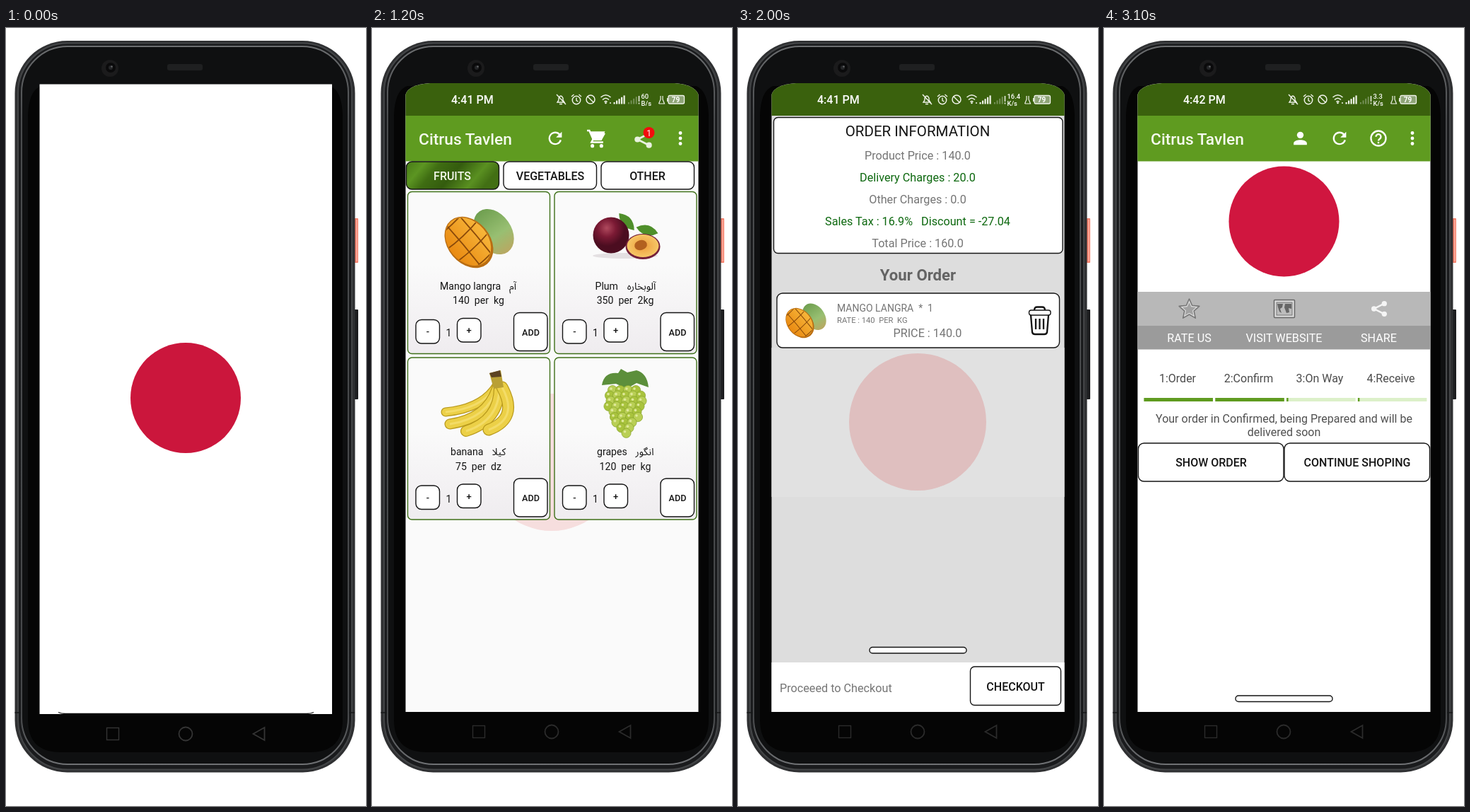
An HTML page for the animation above (3300 ms loop, 509 by 1100 pixels).

```html
<!DOCTYPE html>
<html lang="en">
<head>
<meta charset="utf-8">
<title>Grocery app walkthrough</title>
<style>
html, body { margin: 0; width: 100%; height: 100%; overflow: hidden; background: #fff; }
svg { display: block; width: 509px; height: 1100px; }
text { font-family: Roboto, "Noto Sans Arabic", "DejaVu Sans", sans-serif; white-space: pre; }
</style>
</head>
<body>
<svg id="stage" viewBox="0 0 509 1100"></svg>
<script>
const GREEN = '#5f9b20', GREY = '#757575', INK = '#151515', BRAND = 'Citrus Tavlen';

// ---- drawing helpers ----
const rect = (x, y, w, h, r, fill, more = '') =>
  `<rect x="${x}" y="${y}" width="${w}" height="${h}" rx="${r}" fill="${fill}" ${more}/>`;
const band = (y1, y2, fill) => rect(47, y1, 415, y2 - y1, 0, fill);
const box = (x1, y1, x2, y2, r = 8, fill = '#fff', line = INK) =>
  rect(x1, y1, x2 - x1, y2 - y1, r, fill, `stroke="${line}" stroke-width="1.4"`);
const dot = (x, y, r, fill, more = '') => `<circle cx="${x}" cy="${y}" r="${r}" fill="${fill}" ${more}/>`;
const oval = (x, y, rx, ry, turn, fill, more = '') =>
  `<ellipse cx="${x}" cy="${y}" rx="${rx}" ry="${ry}" transform="rotate(${turn} ${x} ${y})" fill="${fill}" ${more}/>`;
const shape = (d, fill, more = '') => `<path d="${d}" fill="${fill}" ${more}/>`;
const line = (d, color, w = 2, more = '') =>
  `<path d="${d}" fill="none" stroke="${color}" stroke-width="${w}" ${more}/>`;
const text = (s, x, y, size = 16.2, fill = INK, weight = 400, anchor = 'start') =>
  `<text x="${x}" y="${y}" font-size="${size}" fill="${fill}" font-weight="${weight}" text-anchor="${anchor}">${s}</text>`;
const mid = (s, x, y, size, fill, weight) => text(s, x, y, size, fill, weight, 'middle');
const at = (x, y, scale, body) => `<g transform="translate(${x} ${y}) scale(${scale})">${body}</g>`;
const range = (n, f) => Array.from({ length: n }, (_, i) => f(i)).join('');

// ---- icons, centred on 0,0 ----
const person = dot(0, -4, 4, '#fff') + shape('M-8 8V6C-8 3-3 2 0 2S8 3 8 6V8Z', '#fff');
const refresh = c => line('M5.3-4.6A7 7 0 1 0 6.7 2', c, 2) + shape('M8-8V-1H1Z', c);
const help = dot(0, 0, 9, 'none', 'stroke="#fff" stroke-width="2"') +
  line('M-3-2A3 3 0 1 1 1.8.4Q0 1.6 0 3', '#fff', 2) + rect(-1, 4.2, 2, 2, 0, '#fff');
const cart = c => line('M-11-9H-8.4L-4 1H4.5L8.5-6.2', c, 2) + shape('M-7.5-8H9L5 1H-4Z', c) +
  line('M-4 0L-6 4H7', c, 2) + dot(-5, 8, 2, c) + dot(5, 8, 2, c);
const share = c => line('M6-6L-6 0L6 6', c, 2) + dot(-6, 0, 3, c) + dot(6, -6, 3, c) + dot(6, 6, 3, c);
const dots = (x, y, c) => [-7.5, 0, 7.5].map(d => dot(x, y + d, 2.4, c)).join('');
const arrow = (x, y) => shape(`M${x - 6} ${y - 3}h12l-6 6Z`, GREY);
const badge = (x, y) => dot(x, y, 8, '#f30d0d') + mid('1', x, y + 4.5, 12, '#fff');
const star = (size, more) => `<polygon points="${range(10, i => {
  const r = i % 2 ? size * .47 : size, a = i * Math.PI / 5;
  return `${(r * Math.sin(a)).toFixed(1)},${(-r * Math.cos(a)).toFixed(1)} `;
})}" ${more}/>`;

// ---- fruit ----
const mango = oval(172, 288, 35, 25, 55, 'url(#greenSkin)') +
  oval(137, 303, 40, 30, 50, '#b96d12') + oval(136, 302, 37.5, 28, 50, 'url(#pulp)') +
  `<g clip-path="url(#cut)">${[-24, -8, 8, 24].map(k =>
    line(`M${100 + k} ${330 + k}Q${135 + k} ${310 + k} ${170 + k} ${265 + k}`, '#8a4a0a', 1.8) +
    line(`M${105 + k} ${262 - k}Q${140 + k} ${300 - k} ${172 + k} ${342 - k}`, '#8a4a0a', 1.8)).join('')}</g>`;
const leaf = (x, y, turn, c = '#4f8f2a') =>
  `<g transform="translate(${x} ${y}) rotate(${turn})">${shape('M-16 0Q0-14 16 0Q0 14-16 0', c)}</g>`;
const plum = oval(358, 322, 46, 4, 0, '#e4e0e2') + leaf(360, 274, 48) + leaf(389, 286, 15) +
  dot(338, 293, 25.5, 'url(#plumSkin)') + oval(383, 309, 24.5, 18, 0, '#75203a') +
  oval(383, 308, 22.5, 16, 0, 'url(#plumFlesh)') + oval(380, 307, 9, 7, -15, '#b3601f');
const fingers = [['M176 506Q156 538 104 543', 13], ['M177 508Q164 552 110 560', 15],
  ['M180 508Q180 555 133 570', 16], ['M184 508Q208 552 165 568', 17]];
const banana = fingers.map(([d, w]) =>
  line(d, '#b99a1c', w, 'stroke-linecap="round"') + line(d, '#ecd047', w - 2.5, 'stroke-linecap="round"') +
  line(d, '#f3dc68', 3)).join('') + shape('M166 488L182 484L186 508L172 510Z', '#b9a035') +
  shape('M166 488L181 484L183 493L169 494Z', '#5c4322');
const grapes = shape('M325 505Q328 486 348 488L352 482L361 487L374 484Q389 488 391 508L374 502L360 510L345 503Z', '#5c8f3b') +
  range(9, row => {
    const n = [4, 5, 5, 5, 4, 4, 3, 2, 1][row];
    return range(n, i => {
      const x = 358 + (i - (n - 1) / 2) * 11 + (row % 3 - 1) * 1.5, y = 512 + row * 7.6;
      return dot(x, y, 6.6, (i + row) % 2 ? '#a9c33d' : '#b9cf55', 'stroke="#86a32c" stroke-width=".7"') +
        dot(x - 2, y - 2, 1.8, '#dfe99b');
    });
  });

const defs = `<defs>
  <linearGradient id="tab" x2="1" y2=".25"><stop stop-color="#477a16"/><stop offset=".2" stop-color="#5c9522"/>
    <stop offset=".36" stop-color="#3f6d12"/><stop offset=".58" stop-color="#345c0e"/><stop offset=".84" stop-color="#5a9021"/><stop offset="1" stop-color="#426f14"/></linearGradient>
  <linearGradient id="card" x2="0" y2="1"><stop offset=".45" stop-color="#fafafa"/><stop offset="1" stop-color="#efecef"/></linearGradient>
  <linearGradient id="greenSkin"><stop stop-color="#6f9f50"/><stop offset=".6" stop-color="#98bf72"/><stop offset="1" stop-color="#b9a862"/></linearGradient>
  <linearGradient id="pulp" x2="0" y2="1"><stop stop-color="#f7b63a"/><stop offset="1" stop-color="#e98a12"/></linearGradient>
  <radialGradient id="plumSkin" cx=".38" cy=".3"><stop stop-color="#b04a5e"/><stop offset=".5" stop-color="#7b1a34"/><stop offset="1" stop-color="#4b0d20"/></radialGradient>
  <radialGradient id="plumFlesh"><stop stop-color="#ee9a3c"/><stop offset="1" stop-color="#f6c766"/></radialGradient>
  <linearGradient id="tick" x2="1" y2="1"><stop stop-color="#2f6cae"/><stop offset=".5" stop-color="#5a9fe2"/><stop offset="1" stop-color="#3f82c8"/></linearGradient>
  <linearGradient id="rim" x2="0" y2="1"><stop stop-color="#6c6e70"/><stop offset=".1" stop-color="#4a4c4e"/><stop offset=".93" stop-color="#46484a"/><stop offset="1" stop-color="#6f7174"/></linearGradient>
  <clipPath id="cut"><ellipse cx="136" cy="302" rx="37" ry="27.5" transform="rotate(50 136 302)"/></clipPath>
  <clipPath id="map"><rect x="71" y="463" width="367" height="229"/></clipPath>
  <clipPath id="screen"><path d="M47.500 967V94Q52 80 82 78H428Q456 80 461.500 94V967Z"/></clipPath>
  <g id="mango">${mango}</g>
</defs>`;

// ---- phone ----
const phone = rect(490, 269, 8, 63, 1, '#f5816c') + rect(495, 271, 2, 59, 0, '#fba596') +
  rect(489, 398, 9, 127, 1, '#1d1e20') +
  rect(12.5, 18, 481, 1034.5, 74, '#2f3032') +
  rect(17, 21.5, 472, 1027, 70, '#1a1b1d', 'stroke="#434547" stroke-width="2"') +
  rect(22, 26, 462, 1015, 65, '#0f1011', 'stroke="url(#rim)" stroke-width="2"') +
  line('M12.5 968h8M485 968h8', '#161718', 1.5) +
  shape('M31 124Q32 88 50 82H458Q475 88 476 124V978Q476 1024 430 1024H77Q31 1024 31 978Z', '#050505') +
  dot(147, 57, 12, '#1b1b1c') + dot(148, 56, 7, '#0a0a0b') + dot(148, 56, 3, '#252628') + dot(149.5, 54.5, 1.2, '#66686a') +
  rect(228, 51, 50, 9, 3, '#1f2021');

const nav = (y, c = '#2b2b2b') => box(142.5, y - 8.5, 159.5, y + 8.5, 0, 'none', c) +
  dot(254, y, 9.5, 'none', `stroke="${c}" stroke-width="1.8"`) +
  line(`M349.5 ${y}L365.5 ${y - 9}V${y + 9}Z`, c, 1.8);

const statusBar = (clock, rate, unit) => {
  const c = '#f0f3ea';
  return band(78, 124, '#3a610d') + text(clock, 112, 107, 16, '#fff', 500) +
    line('M262 105H272L270 102V99Q267 93 264 99V102ZM261 94L274 108M265 107.5H269', c, 1.4) +
    dot(289, 102, 5.7, 'none', `stroke="${c}" stroke-width="1.5"`) +
    line('M289 98.5V102.5L291.5 104M282 97L285.5 94M296 97L292.5 94', c, 1.4) +
    dot(309, 101, 6, 'none', `stroke="${c}" stroke-width="1.5"`) + line('M305 97L313 105', c, 1.4) +
    line('M323.5 98Q330.5 91.5 337.5 98M326 101.5Q330.5 97 335 101.5M328.5 104.5Q330.5 102.5 332.5 104.5', c, 1.6) +
    dot(330.5, 106, 1.3, c) + dot(337, 106, 1, c) +
    range(5, i => rect(341.5 + i * 3.5, 105 - i * 2.4, 2.2, 2.5 + i * 2.4, 0, c)) +
    range(4, i => rect(362 + i * 3.6, 105 - i * 2.6, 1.9, 2.5 + i * 2.6, 0, '#77925a')) +
    line('M377.5 96V104M377.5 105.5V107.5', c, 1.5) +
    text(rate, 380.5, 99.5, 9.4, '#fff', 500) + text(unit, 380.5, 109.5, 9.4, '#fff', 500) +
    line('M405.5 107H413.5L411 101V96M405.5 107L408 101V96', c, 1.2) +
    rect(419, 95.5, 22.5, 11.5, 2, '#8fa578', `stroke="${c}" stroke-width="1.3"`) + rect(417, 99, 1.6, 5, 0, c) +
    mid('79', 429.5, 105, 10, '#fff', 700);
};
const appBar = icons => band(124, 188.5, GREEN) + text(BRAND, 66, 165, 22.8, '#f6faef', 500) +
  icons + dots(436, 156, '#fff');
const homeIcons = at(277.5, 156, 1.17, person) + at(333, 156, 1.17, refresh('#fff')) + at(388, 156, 1.17, help);
const handle = y => box(186, y, 323, y + 8.5, 4.2);
const checkout = band(897, 967, '#fff') + text('Proceeed to Checkout', 59, 938.5, 16.2, GREY) +
  box(328.5, 903, 456.5, 957.5, 6) + mid('CHECKOUT', 392.5, 936.5, 16, INK, 500);
const screen = (bg, body) => `<g clip-path="url(#screen)">${band(78, 968, bg)}${body}</g>` + nav(995);

// ---- scenes ----
const splash = () => rect(47.5, 79.5, 413.5, 890.5, 0, '#fff') + line('M74 967.5Q78 969.5 84 969.5H425Q431 969.5 435 967.5', '#111', 1.3) +
  dot(254, 523, 78, '#cb163c') + nav(998, '#343434');

const shopCard = (y, name, sub, place, logoY, r) => box(52.5, y, 456.5, y + 126, 8, '#fcfcfc') +
  dot(116.5, logoY, r, '#dc1c1c') + dots(436, y + 20.5, '#616161') +
  text(name, 191, y + 51.5, 18.4, GREY) + text(sub, 191, y + 66.5, 9.2, GREY) +
  mid(place, 320.5, y + 116, 12.3, GREY);
const home = () => screen('#fcfcfc', dot(254, 632, 97, '#f7dcdc') +
  statusBar('4:40 PM', '505', 'B/s') + appBar(homeIcons) +
  box(48.5, 189, 460.5, 261.5, 9, '#fcfcfc') + text('Select City', 59, 231.5, 16) +
  text('Karachi', 165, 232, 18.4) + arrow(254, 225.5) + text('Whole city', 300, 232, 18.4) + arrow(434, 225.5) +
  shopCard(267, 'CITRUS TAVLEN MAIN', 'OVREN TAMIR', 'Chaman-e-Sorvaan - sector K7', 323, 30) +
  shopCard(404, 'OZMERI', 'SHOP', 'Rangan Bazar - address', 466, 32) +
  box(71, 914.5, 438, 966.5, 8, '#fcfcfc') + mid('Pending Order', 254, 936, 16.1) +
  mid('Click Here to view', 254, 962.5, 16.1, GREY));

const product = (x, y, name, nx, local, lx, price, pic) => {
  const bx = x + 11.5, by = y + 181;
  return box(x, y, x + 201, y + 229, 6, 'url(#card)', '#3f7019') + pic +
    text(name, nx, y + 138, 14.1) + mid(local, lx, y + 138, 14) + mid(price, x + 100, y + 158.5, 14.1) +
    box(bx, by, bx + 33.5, by + 33.5) + mid('-', bx + 17, by + 21.5, 13, INK, 500) +
    mid('1', bx + 46.5, by + 23.5, 14) +
    box(bx + 58.5, by - 2, bx + 92, by + 31.5) + mid('+', bx + 75, by + 19.5, 13, INK, 500) +
    box(bx + 138.5, by - 10, bx + 186, by + 44) + mid('ADD', bx + 162.5, by + 22, 12.6, INK, 500);
};
const tick = oval(133, 353, 18, 2.5, 0, '#d5d8dc') +
  shape('M110 301L124 295Q132 310 135 326Q158 284 193 266Q160 302 140 351L125 351Q120 322 110 301Z', 'url(#tick)') +
  line('M114 303Q123 324 128 349M138 343Q158 300 188 270', '#b9daf8', 1.6);
const added = tick + mid('1  kg  Mango langra', 150.5, 387, 16, GREY) +
  mid('Price : 140.0  Rs only', 151, 409, 16, GREY) + text('Click', 77.5, 431, 16, GREY) +
  at(128.5, 425.5, .82, cart('#222')) + text('To continue', 140, 431, 16, GREY);
const catalog = (rate, done) => screen('#fafafa', dot(254, 614, 97, '#f6dede') +
  statusBar('4:41 PM', rate, 'B/s') +
  appBar(at(259, 156, 1.17, refresh('#fff')) + at(318, 156.5, 1.27, cart('#fff')) +
    at(383.5, 157.5, 1.36, share('#e9f1df')) + badge(391.5, 148) + (done ? badge(327, 148) : '')) +
  box(48.5, 189, 179.5, 228, 8, 'url(#tab)') + box(186, 189, 317.5, 228) + box(324, 189, 455.5, 228) +
  mid('FRUITS', 113.5, 214.5, 16, '#f3f8ea', 500) + mid('VEGETABLES', 252, 214.5, 16, INK, 500) +
  mid('OTHER', 389.5, 214.5, 16, INK, 500) +
  (done ? rect(48, 230, 205, 234, 0, '#fafafa') + added
    : product(50.5, 231.5, 'Mango langra', 96, 'آم', 199, '140  per  kg', '<use href="#mango"/>')) +
  product(258, 231.5, 'Plum', 315.5, 'آلوبخارہ', 381, '350  per  2kg', plum) +
  product(50.5, 466, 'banana', 111, 'کیلا', 179.5, '75  per  dz', banana) +
  product(258, 466, 'grapes', 318, 'انگور', 385.5, '120  per  kg', grapes) +
  (done ? rect(193.5, 843, 122, 41, 9, '#4b4c53') + mid('Added to Cart', 254.5, 869.5, 16.2, '#e8e8ea') : ''));

const order = () => screen('#ddd', band(452, 663, '#e1e1e1') + dot(254, 557, 97, '#dfbfbf') +
  statusBar('4:41 PM', '16.4', 'K/s') +
  box(50.5, 126.5, 459, 318.5, 6) + mid('ORDER INFORMATION', 254, 153, 20.5) +
  [['Product Price : 140.0', GREY], ['Delivery Charges : 20.0', '#0d680f'], ['Other Charges : 0.0', GREY],
    ['Sales Tax : 16.9%   Discount = -27.04', '#0d680f'], ['Total Price : 160.0', GREY]]
    .map(([s, c], i) => mid(s, 254, 185.5 + i * 31.1, 16.2, c)).join('') +
  mid('Your Order', 254.5, 357, 22.2, '#646464', 700) + box(55, 375, 454.5, 452, 8) +
  at(7.3, 239.8, .585, '<use href="#mango"/>') +
  text('MANGO LANGRA  *  1', 140, 401, 14, GREY) + text('RATE : 140  PER  KG', 140, 417, 11.2, GREY) +
  text('PRICE : 140.0', 219.5, 437, 16.2, GREY) +
  line('M414 406L416 430Q416.5 433 420 433H433Q436.5 433 437 430L439 406M421 411V426M426.5 411V426M432 411V426', '#111', 2.3) +
  box(411.5, 399, 442, 406, 3, '#fff') + line('M419 399Q419 394.5 423 394.5H430Q434 394.5 434 399', '#111', 2.3) +
  handle(875.5) + checkout);

const cityMap = () => {
  const road = (d, w = 3.5) => line(d, '#e5bd4f', w + 1.2) + line(d, '#f8d978', w);
  const lab = (s, x, y, size, c = '#4c4c52') => mid(s, x, y, size, c);
  return `<g clip-path="url(#map)">` + rect(71, 463, 367, 229, 0, '#e9e8ee') +
    range(15, i => line(`M${50 + i * 30} 692L${110 + i * 30} 463M60 ${420 + i * 24}L450 ${490 + i * 24}`, '#fff', 1.3)) +
    range(12, i => line(`M${232 + i * 6} 580L${215 + i * 6} 640M225 ${582 + i * 5}L310 ${594 + i * 5}`, '#fafafc', .9)) +
    shape('M71 628L92 633L102 650L120 654L128 676L152 692H71Z', '#8ab6f2') +
    shape('M118 546L136 548L134 566L122 562ZM316 580L338 574L344 594L322 604ZM180 628L190 636L184 648ZM424 640L438 632V660Z', '#a5d8ae') +
    line('M262 692Q290 652 322 636T382 622T438 600', '#8ab6f2', 6) +
    road('M71 590Q112 574 150 578T226 574T282 530T306 463') + road('M71 510Q112 528 152 552T222 580T268 640T290 692') +
    road('M128 463Q150 490 176 515T240 568') + road('M71 625Q128 600 176 568T268 498T360 484T438 463', 2.5) +
    road('M306 500Q340 530 380 552T438 590', 3) + road('M200 692Q214 630 234 600T330 640T438 676', 2.5) +
    lab('BLOCK D', 107, 490, 10.5) +
    ['NORTH', 'NAZIMABAD', 'TOWN', 'شمالی ناظم', 'آباد ٹاؤن'].map((s, i) => lab(s, 223.5, 474 + i * 12.4, 10.5)).join('') +
    lab('Chanesa', 389, 500, 14, '#333') + lab('Iqbal Colony', 389.5, 516, 14, '#333') +
    text('Shah Faisal', 372, 580, 18, '#222') + text('Town', 398, 602, 17, '#222') +
    lab('شاہ فیصل', 414, 622, 16, '#222') + lab('ٹاؤن', 419, 643, 16, '#222') +
    lab('Sector F', 299, 665, 13.8, '#222') + lab('KORANGI', 356, 675, 10.5) + lab('کورنگی', 356, 688, 10.5) +
    lab('Karachi', 154, 631, 27, '#111') + lab('کراچی', 155, 662, 24, '#111') +
    rect(104, 573, 32, 14, 3, '#4f8d2e') + mid('M-10', 120, 583.5, 9.5, '#fff', 700) +
    dot(109, 674, 10, '#4285f4') +
    rect(381, 477, 43, 43, 2, '#fff', 'opacity=".78"') + rect(381, 588, 43, 84, 2, '#fff', 'opacity=".78"') +
    dot(402.5, 497, 7, 'none', 'stroke="#666" stroke-width="2"') + dot(402.5, 497, 3.4, '#666') +
    line('M402.5 487V490M402.5 504V507M392.5 497H395.5M409.5 497H412.5', '#666') +
    line('M393 607H412M402.5 597.5V616.5M393 651H412', '#666', 3) +
    shape('M254 577Q252 564 245 556A14.5 14.5 0 1 1 263 556Q256 564 254 577Z', '#ea36e6', 'stroke="#c41fc0" stroke-width=".6"') +
    dot(254, 544, 5.2, '#7b0f84') + '</g>';
};
const details = () => {
  const address = ['Q3R7+K5M, ZEB Rd, Toral Encampment,', 'Karachi, Karachi City, Sindh, Pakistan'];
  return screen('#dcdcdc', statusBar('4:42 PM', '309', 'B/s') +
    box(50.5, 126.5, 459, 319, 6, '#dadada', '#cfcfcf') + mid('ORDER INFORMATION', 254, 153, 20.5, '#c4c4c4') +
    mid('Product Price : 140.0', 254, 185.5, 16.2, '#d3d3d3') + mid('Delivery Charges : 20.0', 254, 216.5, 16.2, '#c3c9c3') +
    mid('Other Charges : 0.0', 254, 247.5, 16.2, '#cecece') +
    checkout + box(50.5, 251.5, 459, 895, 8) + mid('Enter your details', 254.5, 281, 16.5, '#666') +
    box(62, 292.5, 447, 338, 5) + text('YOUR NAME', 73, 323.5, 20.5, '#999') +
    box(62, 344.5, 447, 389.5, 5) + text('YOUR EMAIL', 73, 375, 20.5, '#999') +
    box(62, 402, 447, 447, 5) + text('Pk(+92)', 71, 431, 18.4) + arrow(172, 425) +
    text('Phone no(3XX-xxxxxxx)', 209, 429, 20.5, '#999') + line('M204 438H443', '#888', 1.2) +
    box(62, 454, 447, 884, 6) + cityMap() +
    text(address[0] + ' Karachi,', 71, 710, 16.2, GREY) + text('Karachi City, Sindh, Pakistan', 71, 729, 16.2, GREY) +
    text('24.317604928150773', 71, 773, 16.2, GREY) + text('61.42709385610274', 71, 795, 16.2, GREY) +
    box(71, 800, 247, 833, 5) + box(248, 800, 438, 833, 5) +
    mid('USE THIS LOCATION', 159, 822, 13.9, INK, 500) + mid('USE OTHER LOCATION', 343, 822, 13.9, INK, 500) +
    text(address[0], 71, 861, 16, GREY) + text(address[1], 71, 880, 16, GREY) +
    at(375, 863.5, 1.45, refresh('#111')) + dot(415, 863.5, 8.5, '#34a853'));
};

const progress = () => {
  const steps = ['1:Order', '2:Confirm', '3:On Way', '4:Receive'];
  return screen('#fff', statusBar('4:42 PM', '3.3', 'K/s') + appBar(homeIcons) +
    dot(254.5, 273.5, 78, '#d0163f') +
    band(373, 421, '#b8b8b8') + band(421, 454.5, '#9b9b9b') +
    at(120.5, 398, 1, star(15, 'fill="#dcdcdc" stroke="#777" stroke-width="1.6" stroke-linejoin="round"') + star(10, 'fill="#a2a2a2"')) +
    rect(240.5, 384.5, 29, 25, 1, '#dcdcdc', 'stroke="#666" stroke-width="1.5"') +
    rect(244, 388, 22, 18, 0, '#bdbdbd', 'stroke="#777"') +
    shape('M245 390H253L252 395L249 397L251 403L248 401L246 395ZM256 390H265V397L261 396L262 402L258 403L255 395Z', '#666') +
    at(389, 397, 1.22, share('#f5f5f5')) +
    mid('RATE US', 120.5, 444, 16.2, '#fff') + mid('VISIT WEBSITE', 254.5, 444, 16.2, '#fff') + mid('SHARE', 388.5, 444, 16.2, '#fff') +
    steps.map((s, i) => {
      const x = 56.5 + i * 100.8;
      return mid(s, 104 + i * 100.5, 500.5, 16, '#4b4b4b') + rect(x, 523, 97.5, 5, 0, '#dcf0c9') +
        rect(x, 523, i < 2 ? 97.5 : 2.5, 5, 0, GREEN);
    }).join('') +
    mid('Your order in Confirmed, being Prepared and will be', 254.5, 558, 16, '#505050') +
    mid('delivered soon', 254.5, 577, 16, '#505050') +
    box(48.5, 587, 254, 641, 8) + box(255, 587, 460.5, 641, 8) +
    mid('SHOW ORDER', 151.5, 620, 16, INK, 500) + mid('CONTINUE SHOPING', 358, 620, 16, INK, 500) + handle(944));
};

// ---- playback ----
const LOOP = 3300;
const timeline = [
  [0, splash()], [800, home()], [1200, catalog('60', false)], [1600, catalog('210', true)],
  [2000, order()], [2400, details()], [2800, progress()]
];
const stage = document.getElementById('stage');
stage.innerHTML = defs + phone + timeline.map(([, body]) => `<g class="scene" display="none">${body}</g>`).join('');
const scenes = [...stage.querySelectorAll('.scene')];
const start = performance.now();
let shown = -1;

function play() {
  const t = (performance.now() - start) % LOOP;
  const now = timeline.filter(([from]) => from <= t).length - 1;
  if (now !== shown) {
    scenes.forEach((g, i) => g.setAttribute('display', i === now ? 'inline' : 'none'));
    shown = now;
  }
  requestAnimationFrame(play);
}
play();
</script>
</body>
</html>
```
